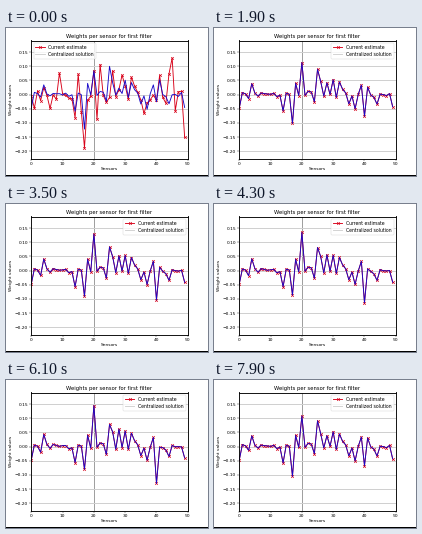
Recreate the animation shown at these times as a matplotlib script. Size 202 by 148 pixels, loop 8 s.

```python
import numpy as np
import matplotlib.pyplot as plt
from matplotlib.animation import FuncAnimation

DPI, W, H = 32, 202, 148
PX = 72 / DPI  # one pixel in points
FRAMES, STEP = 80, 100
RESTART = 64  # step at which the tracked scene starts over
RED, BLUE = "#d80018", "#1808c8"

plt.rcParams.update({"font.family": "DejaVu Sans", "font.size": 9.86,
                     "axes.linewidth": 0.9 * PX})


def profile(seed, spread, peaks):
    """Small noise over all sensors, with a few strong ones set (thousandths)."""
    values = np.random.default_rng(seed).normal(0, spread, 50)
    for sensor, value in peaks.items():
        values[sensor] = value
    return values / 1000


weights = profile(1, 9, {0: -48, 4: 37, 14: -58, 17: -110, 18: 40, 20: 101,
                         25: 94, 26: 45, 28: 34, 30: 52, 32: 44, 35: -33,
                         37: -51, 39: 34, 40: -55, 41: 37, 44: -33, 49: -44})
drift = profile(2, 6, {17: 54, 20: 78, 25: -28, 28: 50, 40: -134, 41: -70})
first_error = profile(3, 22, {15: 67, 16: -60, 17: -66, 18: -60, 21: -85,
                              22: 95, 25: -110, 29: 65, 44: 106, 45: 130,
                              46: -57, 49: -106})
second_error = profile(4, 18, {0: -25, 18: 74, 20: 106, 25: -50, 40: -103,
                               45: 46})


def state(k):
    """Centralized solution and current estimate at step k."""
    if k < RESTART:
        t, error, hold, decay = k * STEP / 1000, first_error, 0, 0.2
    else:
        t, error, hold, decay = (k - RESTART) * STEP / 1000, second_error, 0.5, 0.13
    # weights are given for t = 1 s and settle slowly from there
    w = weights + drift * (np.exp(-1 / 4) - np.exp(-t / 4))
    return w, w + error * np.exp(-max(t - hold, 0) / decay)


fig = plt.figure(figsize=(W / DPI, H / DPI), dpi=DPI, facecolor="white")
ax = fig.add_axes([0.125, 17.5 / H, 0.775, 118 / H])
ax.set(xlim=(0, 50), ylim=(-0.226, 0.1915), xlabel="Sensors",
       ylabel="Weight values", yticks=np.arange(-4, 4) * 0.05)
ax.set_title("Weights per sensor for first filter")
ax.grid(axis="y", color="#d0d0d0", lw=PX)
ax.axvline(20, color="#a0a0a0", lw=PX, zorder=1)

sensors = np.arange(50)
red, = ax.plot(sensors, weights, "-x", color=RED, lw=0.9 * PX, ms=6,
               mew=0.7 * PX, label="Current estimate")
blue, = ax.plot(sensors, weights, "-", color=BLUE, lw=0.9 * PX,
                label="Centralized solution")
legend = ax.legend(loc="upper right", fontsize=10.3)
legend.get_lines()[1].set(color="#d0d0d0")
fig.add_artist(plt.Rectangle((0, 0), 1, 1 / H, color="black", lw=0))


def update(k):
    w, estimate = state(k)
    blue.set_ydata(w)
    red.set_ydata(estimate)
    # keep the legend clear of a high peak on the right
    legend.set_loc("upper left" if estimate[45] > 0.12 else "upper right")
    return red, blue, legend


anim = FuncAnimation(fig, update, frames=FRAMES, interval=STEP,
                     repeat=True, repeat_delay=0, blit=False)
plt.show()
```
